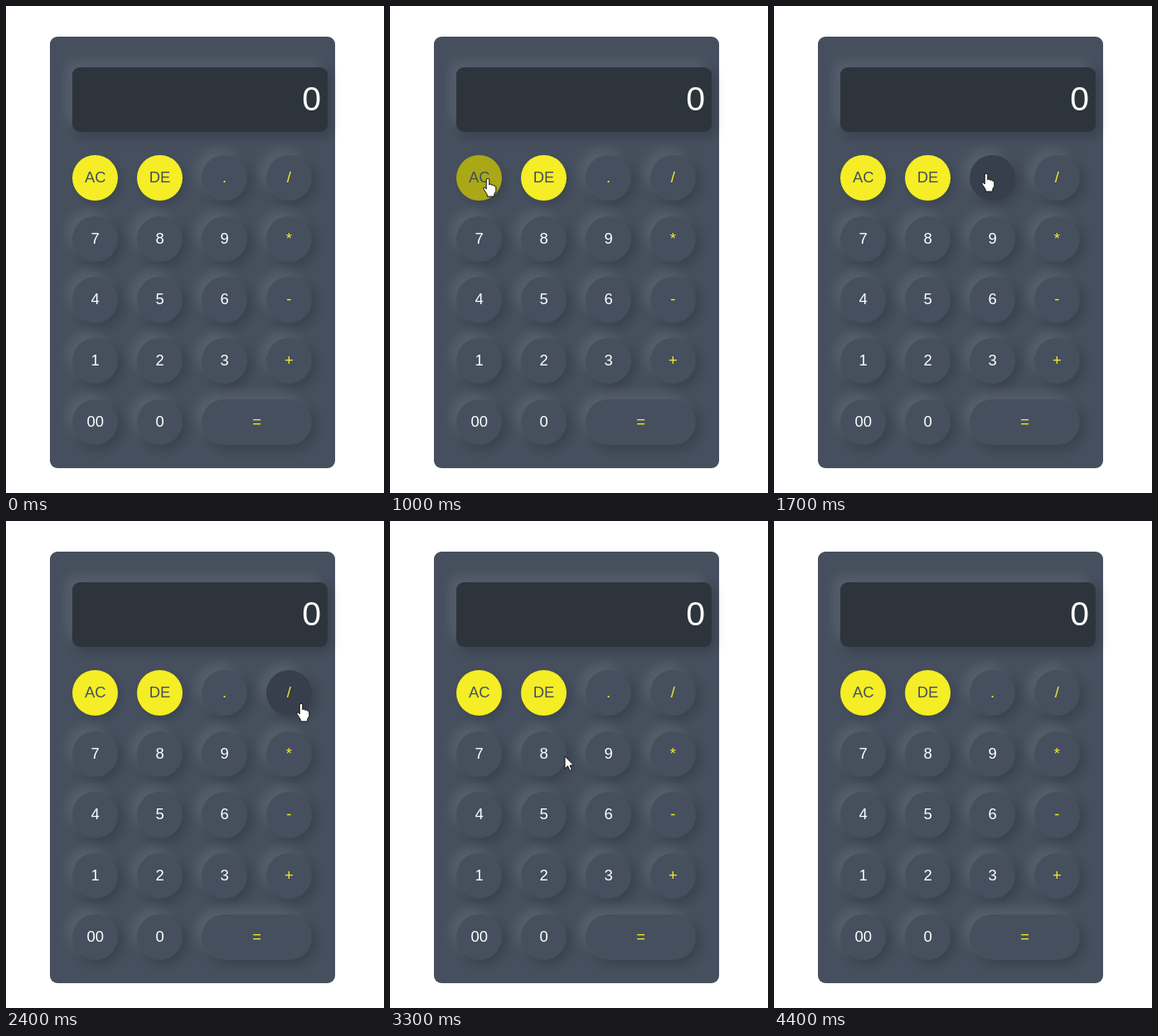
Animation of 456 by 588 pixels, one loop 5.1 s. Source, as an HTML page:

```html
<!DOCTYPE html>
<html lang="en">
<head>
<meta charset="utf-8">
<title>Calculator</title>
<style>
  html, body { margin: 0; width: 100%; height: 100%; overflow: hidden; background: #fff; }
  #stage { position: relative; width: 456px; height: 588px; overflow: hidden;
    font: 18.4px "Liberation Sans", Arial, sans-serif; color: #fff; }
  #stage > * { position: absolute; box-sizing: border-box; }
  #panel { left: 53px; top: 37px; width: 344px; height: 520.5px; border-radius: 9px; background: #454f5d; }
  #display, .key { box-shadow: -7.4px -7.4px 13.8px rgba(255,255,255,.1), 4.6px 4.6px 13.8px rgba(0,0,0,.2); }
  #display { left: 80px; top: 74px; width: 308px; height: 78px; border-radius: 9px; background: #2d343c;
    padding-right: 8px; text-align: right; font-size: 41px; line-height: 76px; }
  .key { height: 55.4px; border-radius: 28px; line-height: 53.6px; text-align: center; }
  .operator { color: #f5ed25; }
  .clear { background: #f5ed25; color: #454f5d; box-shadow: 4.6px 4.6px 9px rgba(0,0,0,.12); }
  .key.hover { background: #363f4b; }
  .clear.hover { background: #aaa817; }
  #pointer { left: 0; top: 0; }
</style>
</head>
<body>
<div id="stage">
  <div id="panel"></div>
  <div id="display">0</div>
  <svg id="pointer" width="456" height="588">
    <path id="cursor" fill="#fff" stroke="#111" stroke-width="1" stroke-linejoin="round"/>
  </svg>
</div>
<script>
const LOOP = 5100, STEP = 100, HIT_RADIUS = 25;
const ARROW = 'M0 0V15L3.5 11.8L6 17.5L8.4 16.4L6 11H10.5Z';
const HAND = 'M-1.8 13V2Q-1.8 .3 0 .3T1.8 2V8Q1.8 6.8 3.4 7T5 8.6Q5.2 7.6 6.5 8T7.8 9.6' +
  'Q8.2 9 9 9.3T9.8 11V15.5L7.8 19V22H-.8V19.5L-4.8 13.4Q-5.6 11.6 -4.4 11T-1.8 13Z';

// Pointer route: time, x, y
const route = [
  [600, 10, 114], [1000, 118, 208], [1100, 122, 218], [1400, 193, 213], [1700, 256, 202],
  [1900, 296, 203], [2100, 335, 205], [2300, 354, 211], [2400, 356, 220], [2600, 349, 262],
  [2700, 343, 275], [2900, 297, 284], [3300, 211, 284], [3700, 119.5, 282], [3900, 78, 276],
  [4100, 32, 254], [4300, 2, 111]
];

const rows = ['AC DE . /', '7 8 9 *', '4 5 6 -', '1 2 3 +', '00 0 ='];
const stage = document.getElementById('stage');
const pointer = document.getElementById('pointer');
const cursor = document.getElementById('cursor');

function makeKey(label, column, row) {
  const width = label === '=' ? 133.6 : 55.4;
  const left = 80 + column * 77.9, top = 180 + row * 73.65;
  const el = document.createElement('div');
  el.textContent = label;
  el.className = 'key' + (/[A-Z]/.test(label) ? ' clear' : /\d/.test(label) ? '' : ' operator');
  Object.assign(el.style, { left: left + 'px', top: top + 'px', width: width + 'px' });
  stage.insertBefore(el, pointer);
  return { el, x: left + width / 2, y: top + 27.7 };
}

const keys = rows.flatMap((labels, row) =>
  labels.split(' ').map((label, column) => makeKey(label, column, row)));

function pointerAt(time) {
  const next = route.findIndex(point => point[0] >= time);
  if (next < 0 || time < route[0][0]) return null;
  const [t1, x1, y1] = route[next];
  if (next === 0) return [x1, y1];
  const [t0, x0, y0] = route[next - 1];
  const part = (time - t0) / (t1 - t0);
  return [x0 + (x1 - x0) * part, y0 + (y1 - y0) * part];
}

function render(time) {
  const position = pointerAt(Math.floor(time / STEP) * STEP);
  let hovering = false;
  for (const key of keys) {
    const hit = position !== null &&
      Math.hypot(position[0] - key.x, position[1] - key.y) < HIT_RADIUS;
    key.el.classList.toggle('hover', hit);
    hovering = hovering || hit;
  }
  cursor.style.display = position ? '' : 'none';
  if (!position) return;
  cursor.setAttribute('d', hovering ? HAND : ARROW);
  cursor.setAttribute('transform', `translate(${position})`);
}

const start = performance.now();
function tick(now) {
  render(Math.max(0, now - start) % LOOP);
  requestAnimationFrame(tick);
}
render(0);
requestAnimationFrame(tick);
</script>
</body>
</html>
```
